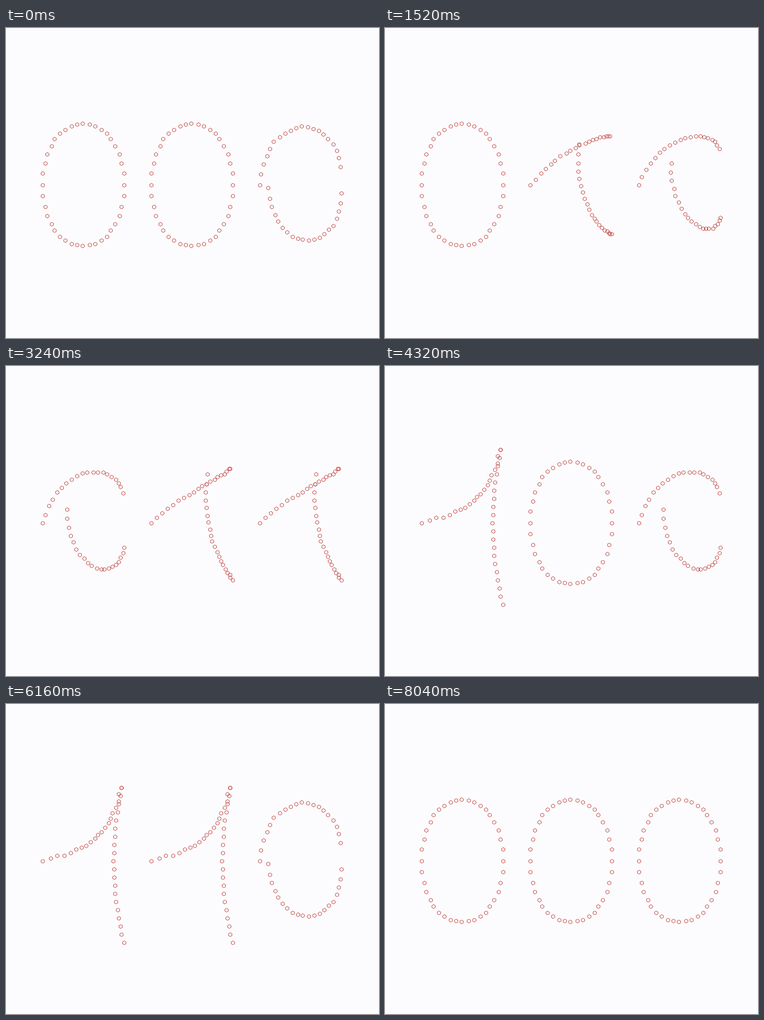
An HTML page that plays this animation: 821x682 px, repeating every 8080 ms.

```html
<!DOCTYPE html>
<html lang="en">
<head>
<meta charset="utf-8">
<title>Binary counter</title>
<style>
  html, body { margin: 0; width: 100%; height: 100%; overflow: hidden; background: #fcfcfe; }
  svg { display: block; }
  path { fill: none; stroke: #b52620; stroke-width: 1; }
</style>
</head>
<body>
<svg width="821" height="682" viewBox="0 0 821 682"><path id="dots"/></svg>
<script>
const LOOP = 8080, FRAME = 40;
const STEPS_PER_FRAME = 0.43, FIRST_STEP = 1.4, STEPS_PER_COUNT = 11;
const ORIGIN_X = 81, ORIGIN_Y = 346, UNIT = 1.993, DIGIT_GAP = 120;
const DOTS_PER_CURVE = 20;

// Each digit is two cubic Bezier curves on an integer grid.
const ZERO = [
  [[0, 0], [0, -90], [90, -90], [90, 0]],
  [[90, 0], [90, 90], [0, 90], [0, 0]],
];
const ONE = [
  [[0, 0], [60, -15], [75, -30], [90, -90]],
  [[90, 90], [75, 30], [75, -30], [90, -90]],
];

// Every interpolation lands on the grid; halves round down.
const gridRound = v => Math.ceil(v - 0.5 - 1e-9);
const gridMix = (a, b, t) => a.map((v, axis) => gridRound(v + (b[axis] - v) * t));

function bezierPoint(points, t) {
  while (points.length > 1) {
    points = points.slice(1).map((point, i) => gridMix(points[i], point, t));
  }
  return points[0];
}

function hexagon([x, y], place) {
  const left = ORIGIN_X + (x + place * DIGIT_GAP) * UNIT;
  const top = ORIGIN_Y + y * UNIT - 4.2;
  return `M${left.toFixed(1)} ${top.toFixed(1)}l3.7 2.1v4.2l-3.7 2.1l-3.7-2.1v-4.2z`;
}

function digit(from, to, p, place) {
  let d = "";
  from.forEach((curve, c) => {
    const controls = curve.map((point, k) => gridMix(point, to[c][k], p));
    for (let i = 0; i < DOTS_PER_CURVE; i++) {
      d += hexagon(bezierPoint(controls, i / DOTS_PER_CURVE), place);
    }
  });
  return d;
}

const dots = document.getElementById("dots");
const shape = (count, place) => (count >> (2 - place)) & 1 ? ONE : ZERO;
let shownStep = -1;

function draw(time) {
  const frame = Math.floor((time % LOOP) / FRAME);
  const step = Math.floor(frame * STEPS_PER_FRAME + FIRST_STEP);
  if (step === shownStep) return;
  shownStep = step;
  const count = Math.floor(step / STEPS_PER_COUNT);
  const p = (step % STEPS_PER_COUNT) / (STEPS_PER_COUNT - 1);
  dots.setAttribute("d", [0, 1, 2].map(place =>
    digit(shape(count, place), shape(count + 1, place), p, place)
  ).join(""));
}

const start = performance.now();
function tick() {
  draw(performance.now() - start);
  requestAnimationFrame(tick);
}
tick();
</script>
</body>
</html>
```
